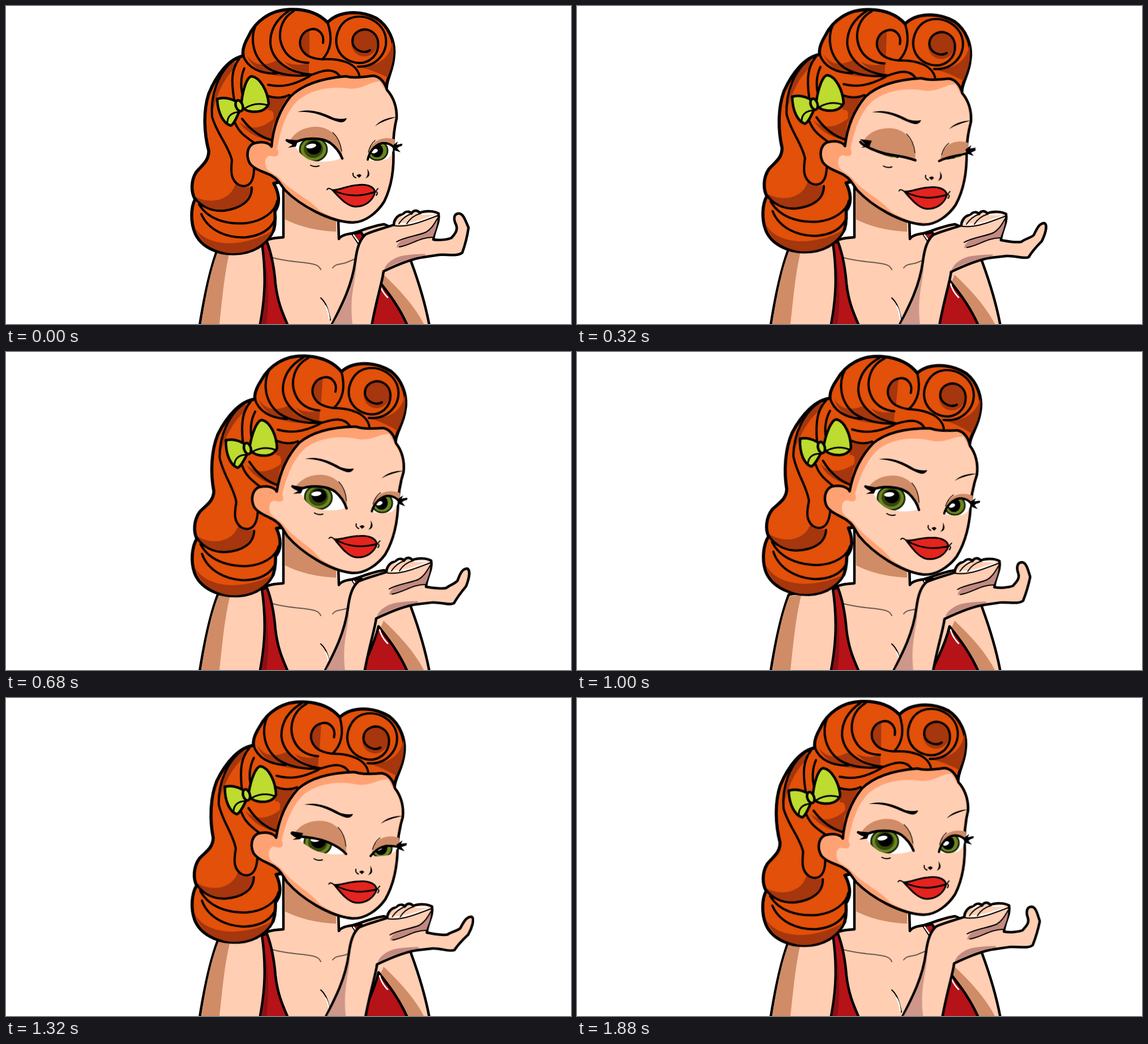
These frames come from a looping animation (998 px wide and 561 px high, 1.92 s). An HTML page without scripts:

```html
<!DOCTYPE html>
<html lang="en">
<head>
<meta charset="utf-8">
<title>Red-haired lady</title>
<style>
html, body { margin: 0; width: 100%; height: 100%; overflow: hidden; background: #fff; }
svg { display: block; width: 100vw; height: 100vh; }
path, ellipse { stroke-linecap: round; stroke-linejoin: round; }

.ink { fill: none; stroke: #000; stroke-width: 4; }
.edge { stroke: #000; stroke-width: 4.5; }
.bold { stroke: #000; stroke-width: 5.5; }
.slim { stroke: #000; stroke-width: 3; }
.thin { fill: none; stroke: #000; stroke-width: 2; }
.fine { fill: none; stroke: #000; stroke-width: 1.2; }
.bone { fill: none; stroke: #6f5a50; stroke-width: 2; }
.glow { fill: none; stroke: #fff; stroke-width: 2.5; }
.skin { fill: #ffceb3; }
.warm { fill: #ffa273; }
.tan { fill: #cf8c67; }
.mauve { fill: #c28a80; }
.hair { fill: #e2500a; }
.deep { fill: #a5360d; }
.lime { fill: #bedb30; }
.red { fill: #b51317; }
.wine { fill: #8c1015; }

/* Head tilts right while the hand drifts left, 24 drawings each way */
.head { transform-origin: 500px 379px; animation: tilt 1.92s steps(24) infinite; }
.arm { animation: drift 1.92s steps(24) infinite; }
@keyframes tilt { 50% { transform: rotate(5.7deg); } }
@keyframes drift { 50% { transform: translate(-18.5px, 3px); } }

.pinky { animation: curl .96s infinite; }
@keyframes curl {
  0%, 100% { animation-timing-function: steps(8); d: path('M755,412C765,414 780,412 787,409C792,403 799,396 795,386C789,374 792,366 800,366C808,366 812,380 817,391C815,405 810,424 806,435C798,442 780,438 765,439L738,443'); }
  33.333% { animation-timing-function: steps(4); d: path('M755,412C767,414 780,417 791,415C799,409 808,408 813,403C820,388 824,382 832,382C838,386 833,402 827,414C819,422 811,430 804,442C796,446 780,439 765,440L738,443'); }
  50% { animation-timing-function: steps(4); d: path('M755,412C767,414 780,418 792,417C802,413 810,413 817,408C826,395 832,389 841,390C846,394 838,412 831,420C822,427 812,434 803,445C794,448 780,440 765,440L738,443'); }
  66.667% { animation-timing-function: steps(8); d: path('M755,412C767,414 780,417 791,415C799,409 808,408 813,403C820,388 824,382 832,382C838,386 833,402 827,414C819,422 811,430 804,442C796,446 780,439 765,440L738,443'); }
}

/* Each eye part blinks between its open and shut outline */
.blink { d: var(--open); animation: blink .96s steps(2) infinite; }
@keyframes blink {
  0%, 20.833%, 41.667%, 100% { d: var(--open); }
  29.167%, 33.333% { d: var(--shut); }
}
.eyeL {
  --open: path('M508,242C523,233 555,230 572,241C583,249 590,259 593,268C577,276 548,277 533,270C521,263 513,253 508,242Z');
  --shut: path('M502,245C517,253 535,259 553,261C570,263 585,266 593,268C582,268 568,267 553,265C535,262 515,254 502,245Z');
}
.lidL {
  --open: path('M501,238C512,220 530,213 548,213C572,213 592,232 594,262L593,268C590,259 583,249 572,241C555,230 523,233 508,242Z');
  --shut: path('M501,238C512,220 530,214 548,214C572,214 592,232 594,262L593,268C585,266 570,263 553,261C535,259 517,253 502,245Z');
}
.lashL {
  stroke-width: 4.5;
  --open: path('M496,237C500,240 504,242 508,242C523,233 555,230 572,241C583,249 590,259 594,269');
  --shut: path('M496,240C498,242 500,244 502,245C517,253 535,259 553,261C570,263 585,266 594,269');
}
.eyeR {
  --open: path('M640,272C641,260 650,245 664,242C674,241 681,245 684,250C683,260 678,268 672,270C662,274 648,274 640,272Z');
  --shut: path('M637,268C645,264 655,261 664,259C672,257 679,256 686,253C680,258 672,260 668,262C658,264 646,267 637,268Z');
}
.lidR {
  --open: path('M640,258C645,240 662,229 686,235L687,246L684,250C681,245 674,241 664,242C650,245 641,260 640,272Z');
  --shut: path('M640,258C645,240 662,229 686,235L687,246L686,253C679,256 672,257 664,259C655,261 645,264 637,268Z');
}
.lashR {
  --open: path('M639,271C641,260 650,245 664,242C674,241 681,245 685,249L698,245');
  --shut: path('M636,269C645,264 655,261 664,259C672,257 679,256 686,253L698,247');
}
</style>
</head>
<body>
<svg viewBox="0 0 998 561" preserveAspectRatio="none">
  <defs>
    <clipPath id="left"><path class="blink eyeL"/></clipPath>
    <clipPath id="right"><path class="blink eyeR"/></clipPath>
  </defs>

  <g class="body">
    <path class="skin edge" d="M341,570C348,525 358,470 374,428L458,414C468,409 478,409 490,408V312H585L588,411C592,404 604,402 612,401C632,395 650,387 668,385C695,395 710,425 716,452C730,490 742,530 749,570Z"/>
    <path class="tan" d="M345,561C351,520 361,465 375,431L396,429C386,470 382,515 377,561Z"/>
    <path class="tan" d="M492,320H583V398C550,397 515,388 492,376Z"/>
    <path class="bone" d="M471,444C500,452 525,451 541,455C550,457 553,459 556,465M577,462C581,455 590,456 600,453L622,444"/>
    <path class="red edge" d="M452,418L461,416C469,437 474,465 476,490C480,525 490,545 499,566H448C456,525 461,480 452,418Z"/>
    <path class="wine" d="M457,440C464,480 465,525 460,561H451C458,525 462,485 457,440Z"/>
    <path class="thin" d="M556,515C566,524 569,535 573,554"/>
    <path class="glow" d="M564,529C570,538 570,546 571,552"/>
    <path class="red edge" d="M612,402L627,399L638,415L628,426Z"/>
    <path class="glow" d="M614,404L624,418"/>
    <path class="tan" d="M667,474C690,496 720,526 738,561H706C690,540 674,515 661,488Z"/>
    <path class="red edge" d="M658,484C672,502 695,530 710,566H625C640,535 652,510 658,484Z"/>
    <path class="glow" d="M660,490C663,502 668,508 674,514"/>
  </g>

  <g class="head">
    <!-- hair mass -->
    <path class="hair bold" d="M419,88C394,93 372,121 358,155C348,186 350,225 358,255C359,273 346,281 336,293C326,309 327,329 334,341C326,356 326,382 334,401C346,428 378,438 403,437C434,437 461,422 473,395C477,380 475,370 475,362C486,347 481,327 473,313L520,300L640,220L672,145C672,128 684,113 685,88C688,62 675,35 655,22C625,6 587,9 568,29C550,10 525,5 501,6C467,7 440,27 428,54C420,68 417,79 419,88Z"/>
    <g class="deep">
      <path d="M402,96C380,115 366,150 364,192C372,155 386,125 408,106Z"/>
      <path d="M426,88C444,112 465,102 478,96C490,110 510,119 530,122C490,128 442,126 426,88Z"/>
      <path d="M519,65C520,50 528,42 536,41V92C526,88 519,78 519,65Z"/>
      <path d="M492,98C508,106 520,104 535,101V121C515,117 502,109 492,98Z"/>
      <circle cx="633" cy="66" r="23"/>
      <path d="M683,62C688,90 680,110 674,126C660,119 645,112 620,107C655,108 678,94 683,62Z"/>
      <path d="M412,205C435,222 455,214 474,198C470,215 470,228 469,237C447,235 425,224 412,205Z"/>
      <path d="M462,161C478,167 490,163 499,158C484,178 477,199 474,210C470,195 478,184 463,184Z"/>
      <path d="M332,335C356,350 396,346 405,314C415,322 428,321 434,318C432,345 402,362 375,361C355,359 340,350 332,335Z"/>
      <path d="M333,390C355,427 420,427 471,396C455,428 420,438 395,436C365,432 345,420 333,390Z"/>
    </g>
    <path class="ink" d="M500,8C475,25 466,46 467,67C470,94 496,118 540,121M441,34C430,60 437,92 463,110C485,123 515,125 538,121M508,9C482,25 477,58 494,82C505,96 521,100 534,100
      M568,29C577,55 575,77 559,94M560,65C563,47 549,39 539,41C524,44 517,58 520,71C525,87 540,93 558,94C590,92 618,100 624,122M536,123C560,113 578,108 590,124
      M643,78C633,85 614,79 612,64C611,46 629,38 642,43C661,51 662,77 648,91C629,109 599,99 588,80C577,59 587,31 607,22C635,11 667,29 671,57C674,83 654,108 622,107
      M419,88C427,109 449,120 478,119M412,93C399,110 397,130 403,165M421,110C414,126 414,145 419,160M402,96C375,117 361,157 364,195C371,223 394,248 399,272C397,293 397,306 410,315C424,322 438,316 438,287
      M463,159C476,163 488,163 500,157M463,139C487,144 508,140 536,124M405,207C412,224 425,232 438,241M417,199C432,219 450,232 471,237
      M333,338C346,356 366,363 386,361C415,357 435,343 434,320M341,350C357,376 388,386 425,383C455,379 476,362 479,344M345,367C358,397 392,410 424,408C450,405 466,395 474,379"/>

    <!-- bow -->
    <g class="lime edge">
      <path d="M373,164C386,160 399,164 409,170L413,184C408,195 403,209 397,211C385,208 374,190 373,164Z"/>
      <path d="M416,170C418,150 425,125 434,124C449,126 462,150 464,172C460,185 445,188 432,186C425,185 420,182 416,178Z"/>
      <ellipse cx="412" cy="176" rx="6" ry="10" transform="rotate(-20 412 176)"/>
    </g>
    <path class="slim" fill="none" d="M421,181C436,171 449,171 462,175M391,206C391,194 399,188 411,187"/>

    <!-- face -->
    <path class="warm edge" d="M469,248C472,212 483,184 502,160C526,136 565,127 600,124C615,128 633,125 648,123C660,124 669,134 673,148C684,160 691,178 690,198C686,215 684,231 684,250C686,284 682,317 668,345C657,363 635,382 612,382C570,380 520,352 493,325C485,315 481,306 470,300C459,293 440,290 431,278C424,266 425,250 436,243C449,238 464,240 469,248Z"/>
    <path class="skin" d="M671,150C683,164 688,180 687,198C683,215 681,231 682,250C683,284 679,317 666,343C655,361 635,380 612,379C590,379 575,372 554,361C533,338 505,328 485,306C479,297 462,294 459,283C455,270 462,262 470,265C480,267 484,262 479,252C485,219 493,190 514,168C540,146 576,141 609,146C635,145 641,134 660,133Z"/>

    <!-- eyes -->
    <g clip-path="url(#left)">
      <path fill="#fff" d="M490,220H600V285H490Z"/>
      <ellipse cx="543" cy="253" rx="24" ry="21" fill="#6b8520" stroke="#1d2805" stroke-width="3"/>
      <ellipse cx="543" cy="252" rx="17" ry="16" fill="#36460f"/>
      <ellipse cx="544" cy="250" rx="13" ry="12"/>
      <ellipse cx="539" cy="247" rx="9" ry="4" fill="#fff" transform="rotate(-12 539 247)"/>
    </g>
    <g clip-path="url(#right)">
      <path fill="#fff" d="M630,230H695V280H630Z"/>
      <ellipse cx="656" cy="255" rx="18" ry="17" fill="#6b8520" stroke="#1d2805" stroke-width="3"/>
      <ellipse cx="655" cy="255" rx="11" ry="12"/>
      <ellipse cx="651" cy="256" rx="6" ry="3.5" fill="#fff" transform="rotate(-20 651 256)"/>
    </g>
    <path class="tan blink lidL"/>
    <path class="tan blink lidR"/>
    <path class="ink blink lashL"/>
    <path class="ink blink lashR"/>
    <path d="M495,235L516,237L512,248L498,250L506,245ZM682,247L692,239L690,245L701,243L691,251L697,258L684,254Z"/>
    <path class="fine" d="M577,223C586,231 591,242 593,256M640,258C642,249 646,242 652,237"/>
    <path class="thin" d="M538,281Q545,285 553,282"/>
    <path d="M515,187C535,180 560,188 578,197C588,200 596,199 602,198C600,203 596,206 590,205C570,201 550,184 515,187Z"/>
    <path d="M652,212C660,202 675,196 690,196C675,200 662,205 652,212Z"/>

    <!-- nose and mouth -->
    <path class="thin" d="M613,295Q612,301 618,303"/>
    <path d="M619,299Q625,294 628,299L624,303ZM638,287Q647,300 635,304Q641,298 638,287Z"/>
    <path class="slim" fill="#e3241f" d="M577,325C592,324 603,317 620,316C633,314 649,316 652,328C648,344 634,354 617,354C602,353 590,339 577,325Z"/>
    <path class="slim" fill="none" d="M577,325C597,334 615,336 631,333C641,331 647,330 652,328"/>
    <path class="thin" d="M567,324Q569,319 577,325M653,327L657,322M655,328Q657,331 654,334"/>
  </g>

  <g class="arm">
    <path class="skin edge" d="M738,443C715,446 690,457 667,468C664,490 652,525 644,575H569C592,530 611,495 617,450C620,426 625,412 635,403C650,396 668,392 685,386C685,377 693,367 701,368C705,361 713,362 716,366C721,358 728,361 731,365C740,361 756,361 764,366C767,382 756,395 755,412"/>
    <path class="mauve" opacity=".8" d="M577,561C596,530 612,496 619,455C618,485 606,510 612,561Z"/>
    <path class="mauve" d="M668,465C672,451 690,442 704,440C726,437 747,437 765,437C735,438 692,451 668,465Z"/>
    <path class="mauve" d="M690,426C692,415 704,408 721,406C740,402 757,388 762,372C764,385 757,398 754,408C733,404 713,424 690,426Z"/>
    <path class="pinky skin edge"/>
    <path class="glow" d="M690,383Q710,386 730,379L757,370M700,371L709,366M735,367H755"/>
    <path class="thin" d="M683,387C707,392 733,381 762,370M694,384C699,376 706,370 717,366M708,384C714,374 722,369 732,366M690,416C704,407 725,406 742,399C752,393 757,383 762,375M666,468L663,488"/>
    <path class="thin" d="M695,425C715,422 731,408 753,408"/>
  </g>
</svg>
</body>
</html>
```
